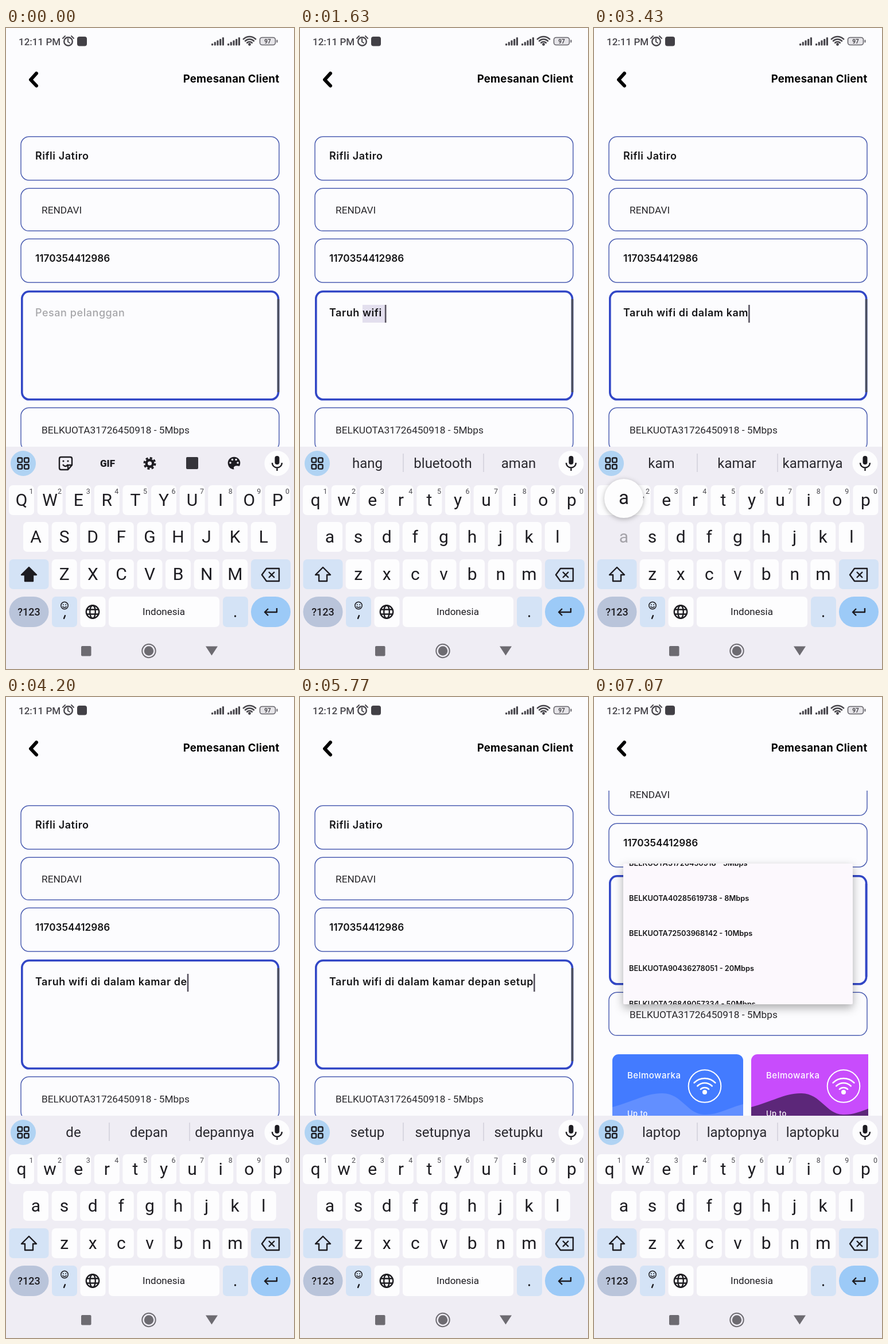
Animation, 502 px wide and 1116 px high, one loop 7.11 s. Source, as an HTML page:

```html
<!DOCTYPE html>
<html lang="id">
<head>
<meta charset="utf-8">
<title>Pemesanan</title>
<style>
html, body { margin: 0; width: 100%; height: 100%; overflow: hidden; background: #fcfcfe; }
#stage { display: block; width: 100%; height: 100%; }
text { font-family: Roboto, sans-serif; fill: #1d1c21; white-space: pre; }
.geo { font: 600 18px Inter, sans-serif; letter-spacing: .55px; fill: #151517; }
.title { font-size: 18.6px; font-weight: 700; letter-spacing: .25px; fill: #000; }
.num { font-size: 17.2px; letter-spacing: 0; }
.hint { font-weight: 500; fill: #a6a6a9; }
.pick { font-size: 17.3px; fill: #29282c; }
.item { font-size: 12.8px; letter-spacing: 0; }
.card { font-size: 15px; font-weight: 500; letter-spacing: .5px; fill: #fff; }
.small { font-size: 13px; }
.box { fill: none; stroke: #4d5fb2; stroke-width: 1.5; }
.focus { stroke: #3247c6; stroke-width: 3.6; }
.mid { text-anchor: middle; }
.key { font-size: 30px; }
.digit { font-size: 12.5px; fill: #4b4a50; }
.word { font-size: 24px; fill: #2a292f; }
.line { fill: none; stroke: #1d1c21; stroke-width: 2.4; stroke-linejoin: round; }
.round { stroke-linecap: round; }
.dark { fill: #1d1c21; }
.status { fill: #48464c; }
.statusline { stroke: #48464c; }
#pop { filter: drop-shadow(0 2px 4px rgba(0, 0, 0, .28)); }
#shade { filter: drop-shadow(0 6px 8px rgba(0, 0, 0, .32)); }
</style>
</head>
<body>
<svg id="stage" viewBox="0 0 502 1116" preserveAspectRatio="none"></svg>
<script>
const LOOP = 7110, SCROLL = 147, KEY_H = 52;

// word, time of its first letter, time per letter, time of the space after it
const WORDS = [
  ['Taruh', 240, 160, 1020],
  ['wifi', 1130, 130, 1560],
  ['di', 1860, 140, 2130],
  ['dalam', 2270, 130, 2920],
  ['kamar', 3080, 140, 3780],
  ['depan', 3980, 170, 5020],
  ['setup', 5160, 125, 5790],
  ['laptop', 5930, 120, 0]
];
const NEXT = {
  Taruh: ['di', 'dulu', 'uang'],
  wifi: ['hang', 'bluetooth', 'aman'],
  di: ['rumah', 'sini', 'mana'],
  dalam: ['rumah', 'hati', 'kamar'],
  kamar: ['mandi', 'tidur', 'depan'],
  depan: ['rumah', 'pintu', 'kamar'],
  setup: ['wifi', 'di', 'yang']
};
const SPECIAL = {
  Taru: ['Taru', 'Taruh', 'Taruna'],
  depan: ['depan', "depan'", 'depannya']
};
const PLANS = ['31726450918 - 5Mbps', '40285619738 - 8Mbps', '72503968142 - 10Mbps',
  '90436278051 - 20Mbps', '26849057334 - 50Mbps'].map(s => 'BELKUOTA' + s);

const typed = [];
for (const [word, start, step, space] of WORDS) {
  [...word].forEach((c, i) => typed.push({ c, t: start + i * step }));
  if (space) typed.push({ c: ' ', t: space });
}
const message = typed.map(e => e.c).join('');

const $ = id => document.getElementById(id);
const ease = x => 1 - Math.pow(1 - Math.min(1, Math.max(0, x)), 3);
const txt = (x, y, s, cls, id) => `<text x="${x}" y="${y}" class="${cls}"${id ? ` id="${id}"` : ''}>${s}</text>`;
const rect = (x, y, w, h, r, fill, extra = '') =>
  `<rect x="${x}" y="${y}" width="${w}" height="${h}" rx="${r}" fill="${fill}" ${extra}/>`;
const circle = (x, y, r, attrs) => `<circle cx="${x}" cy="${y}" r="${r}" ${attrs}/>`;
const path = (d, attrs = 'class="line"') => `<path d="${d}" ${attrs}/>`;
const field = (y, h) => rect(26, y, 450, h, 14, 'none', 'class="box"');

function wifi(x, y, radii, width, color) {
  const arcs = radii.map(r => {
    const k = r * .707;
    return `M${x - k} ${y - k}A${r} ${r} 0 0 1 ${x + k} ${y - k}`;
  }).join('');
  return path(arcs, `fill="none" stroke="${color}" stroke-width="${width}" stroke-linecap="round"`);
}

function statusBar() {
  let s = txt(22, 30, '12:11 PM', 'status', 'clock');
  s += circle(108.5, 23.5, 7.3, 'class="line statusline"') +
    path('M108 19v5l3 2M99 18l4-4M118 18l-4-4', 'class="line statusline round" style="stroke-width:2"') +
    rect(124, 15, 17, 16.5, 4, '#424046');
  for (const x of [358, 386])
    for (let i = 0; i < 5; i++) s += rect(x + i * 4.7, 27 - i * 2.7, 3.2, 3.5 + i * 2.7, 1, '#48464c');
  s += wifi(424.5, 30, [6, 10.5, 15], 2.7, '#48464c') + circle(424.5, 28.5, 2.4, 'class="status"');
  s += rect(442.5, 16.5, 27, 13, 4, '#e6e5e9', 'stroke="#65636a" stroke-width="1.6"') +
    rect(471.5, 20.5, 2, 5, 1, '#65636a') +
    txt(456, 26.8, '97', 'mid status', 'charge');
  return s;
}

function card(x, w, base, wave) {
  return `<svg x="${x}" y="769" width="${w}" height="150">` +
    rect(0, 0, 228, 150, 11, base) +
    path('M0 92C35 83 60 67 88 68C122 69 130 104 160 105C185 106 205 92 228 87V150H0Z', `fill="${wave}"`) +
    txt(26, 42, 'Belmowarka', 'geo card') + txt(26, 108, 'Up to', 'geo card small') +
    circle(161, 55.5, 28.3, 'fill="none" stroke="#fff" stroke-width="2"') +
    wifi(161, 68, [10, 18, 26], 2.6, '#fff') + circle(161, 66, 4, 'fill="#fff"') + '</svg>';
}

function form() {
  return '<svg x="0" y="163" width="502" height="566"><g id="page">' +
    field(189.3, 75.7) + txt(51, 229, 'Rifli Jatiro', 'geo') +
    field(279.3, 74) + txt(62, 323, 'RENDAVI', 'pick') +
    field(367.3, 75.7) + txt(51, 407, '1170354412986', 'geo num') +
    rect(27.8, 458.8, 446.8, 188, 12.5, 'none', 'class="box focus"') +
    path('M474.600 472V634', 'id="edge" stroke="#4b4f5e" stroke-width="3.6"') +
    rect(0, 482, 0, 31, 0, '#e3dfee', 'id="mark"') +
    txt(51, 502, 'Pesan pelanggan', 'geo hint', 'hint') +
    txt(51, 502, '', 'geo', 'row0') + txt(51, 528, '', 'geo', 'row1') +
    rect(0, 482, 2.6, 31, 0, '#57525f', 'id="caret"') +
    field(661.3, 75) + txt(62, 706, PLANS[0], 'pick') +
    card(32, 228, '#437bff', '#628fff') + card(274, 204, '#c84cfc', '#5c2779') +
    '</g></svg>';
}

function menu() {
  const items = PLANS.map((s, i) => txt(10, 45.5 + i * 61.3, s, 'geo item')).join('');
  return '<g id="menu">' + rect(51, 290, 400, 245, 2, '#fcf8fd', 'id="shade"') +
    `<svg id="list" x="51" y="290" width="400" height="245"><g id="items">${items}</g></svg></g>`;
}

const keys = {};
function letters() {
  let s = '';
  [['qwertyuiop', 5, 796], ['asdfghjkl', 30, 860], ['zxcvbnm', 79.7, 925]].forEach(([row, x0, y], r) => {
    [...row].forEach((c, i) => {
      const x = x0 + i * 49.6;
      keys[c] = { x: x + 22, y: y + 26, digit: r === 0 };
      s += rect(x, y, 44, KEY_H, 7, '#fdfdfe', `id="cap-${c}"`) + txt(x + 22, y + 36, c, 'mid key', 'key-' + c);
      if (r === 0) s += txt(x + 39, 810.5, (i + 1) % 10, 'mid digit');
    });
  });
  return s;
}

function tools() {
  const gear = circle(250.5, 758, 5.8, 'class="line" style="stroke-width:4.4"') +
    circle(250.5, 758, 9.4, 'class="line" style="stroke-width:3.2" stroke-dasharray="4 3.383"');
  const palette = circle(397.5, 757.5, 10.8, 'class="dark"') +
    [[391, 757], [394.5, 751.5], [401, 751.5], [404, 757]].map(p => circle(...p, 1.8, 'fill="#efedf4"')).join('') +
    path('M398 769c-3-5 0-8 10-6v6z', 'fill="#efedf4"');
  return '<g id="tools">' +
    path('M96 747h16q3 0 3 3v11l-7 8h-12q-3 0-3-3v-16q0-3 3-3zM108 768v-7h7M99 760q5 6 9 0') +
    circle(100, 754, 1.6, 'class="dark"') + circle(108, 754, 1.6, 'class="dark"') +
    txt(177, 763.5, 'GIF', 'mid', 'anim') + gear + rect(314, 747, 21, 21, 2, '#35343a') + palette + '</g>';
}

function keyboard() {
  const blue = '#d4e3f6';
  let s = rect(0, 729, 502, 387, 0, '#efedf4') + circle(30, 758, 22, 'fill="#b0d3f3"');
  for (const x of [20.5, 32]) for (const y of [748.5, 760]) s += rect(x, y, 7.6, 7.6, 1.8, 'none', 'class="line"');
  s += tools() + '<g id="words">' +
    path('M180 741V773M320 741V773', 'stroke="#cfcdd7" stroke-width="1.4"') +
    [117.5, 249, 381].map((x, i) => txt(x, 766, '', 'mid word', 'word' + i)).join('') + '</g>';
  s += circle(472.5, 758, 22, 'fill="#fdfdfe"') + rect(468.5, 745, 8, 15, 4, '#1d1c21') +
    path('M464 757a8.5 8.5 0 0 0 17 0M472.5 766v5');
  s += letters();
  s += rect(5.5, 925, 69, KEY_H, 7, blue) + rect(427, 925, 69, KEY_H, 7, blue) +
    path('M40 939l13 13h-6v11h-14v-11h-6z', 'class="line" id="shift"') +
    path('M446 952l8-11h22v22h-22zM458 947l10 10M468 947l-10 10');
  s += rect(5.5, 990, 69, 53, 26.5, '#b9c4da') + txt(40, 1022.5, '?123', 'mid', 'sym') +
    rect(80, 990, 44, 53, 7, blue) + circle(102, 1005.5, 6.2, 'class="line" style="stroke-width:1.5"') +
    path('M98.500 1007q3.500 4 7 0', 'class="line" style="stroke-width:1.4"') +
    circle(99.8, 1004, .9, 'class="dark"') + circle(104.2, 1004, .9, 'class="dark"') +
    path('M103 1023l-2 5', 'class="line round"');
  s += rect(129.5, 990, 44, 53, 7, '#fdfdfe') + circle(151, 1016.5, 11.2, 'class="line"') +
    '<ellipse cx="151" cy="1016.5" rx="4.800" ry="11.2" class="line"/>' + path('M141 1012.5h20M141 1020.5h20');
  s += rect(179, 990, 193, 53, 7, '#fdfdfe', 'id="space"') + txt(275, 1022, 'Indonesia', 'mid', 'lang') +
    rect(378, 990, 44, 53, 7, blue) + circle(399.5, 1024, 1.7, 'class="dark"') +
    rect(427, 990, 69, 53, 26.5, '#9ccaf7') + path('M472 1010v7h-21M457 1011l-6 6 6 6');
  s += rect(131, 1076, 17.5, 17.5, 2, '#6d6b71') + circle(249, 1084.5, 11.7, 'fill="none" stroke="#6d6b71" stroke-width="2"') +
    circle(249, 1084.5, 8.2, 'fill="#6d6b71"') + path('M348 1076.500h21l-10.500 16z', 'fill="#6d6b71"');
  return s;
}

function popup() {
  return '<g id="pop">' + circle(0, 0, 34, 'fill="#fdfdfe"') + txt(0, 10, '', 'mid', 'popkey') +
    '<g id="dots">' + [-5, 0, 5].map(x => circle(x, 24, 1.4, 'class="dark"')).join('') + '</g></g>';
}

$('stage').innerHTML = statusBar() +
  path('M53 79L43 90l10 10.500', 'fill="none" stroke="#000" stroke-width="6" stroke-linecap="round" stroke-linejoin="round"') +
  '<text x="476.5" y="94.5" text-anchor="end" class="geo title">Pemesanan Client</text>' +
  form() + menu() + keyboard() + popup();

for (const [id, font] of [['clock', '500 17px'], ['charge', '700 10px'], ['anim', '900 17px'],
  ['sym', '500 18px'], ['lang', '400 17px'], ['popkey', '400 33px']])
  $(id).style.font = font + ' Roboto, sans-serif';

const show = (id, on) => { $(id).style.display = on ? '' : 'none'; };
const set = (id, attrs) => { for (const k in attrs) $(id).setAttribute(k, attrs[k]); };

function suggest(text) {
  const parts = text.split(' '), last = parts[parts.length - 1];
  if (!last) return NEXT[parts[parts.length - 2]];
  const full = WORDS[parts.length - 1][0];
  return SPECIAL[last] || (last === full ? [last, last + 'nya', last + 'ku'] : [last, full, full + 'nya']);
}

function drawText(n) {
  const text = message.slice(0, n);
  const cut = n > 40 ? text.lastIndexOf(' ') + 1 : n;
  const row = cut < n ? 1 : 0;
  $('row0').textContent = text.slice(0, cut);
  $('row1').textContent = text.slice(cut);
  const x = 51 + (n ? $('row' + row).getComputedTextLength() : 0);
  set('caret', { x, y: 482 + row * 26 });
  if (n === 11) {
    const from = 51 + $('row0').getSubStringLength(0, 6);
    set('mark', { x: from, width: x - from });
  }
  show('hint', !n);
  show('tools', !n);
  show('words', n);
  if (n) suggest(text).forEach((w, i) => { $('word' + i).textContent = w; });
  for (const c in keys) $('key-' + c).textContent = n ? c : c.toUpperCase();
  $('shift').style.fill = n ? 'none' : '#1d1c21';
}

function drawPress(key, upper) {
  const k = keys[key];
  show('pop', k);
  if (!k) return;
  const x = Math.min(467, Math.max(35, k.x));
  set('pop', { transform: `translate(${x} ${k.y - 67})` });
  $('popkey').textContent = upper ? key.toUpperCase() : key;
  show('dots', k.digit);
}

let count = -1, held = null;
function hold(key) {
  if (key === held) return;
  for (const [c, down] of [[held, false], [key, true]]) {
    if (c === ' ') set('space', { fill: down ? '#dedde6' : '#fdfdfe' });
    else if (c) {
      show('cap-' + c, !down);
      $('key-' + c).style.opacity = down ? .35 : 1;
    }
  }
  held = key;
}

function render(t) {
  const n = typed.filter(e => e.t <= t).length;
  if (n !== count) drawText(count = n);

  const next = typed[n], lead = next ? next.t - t : Infinity;
  const key = lead <= 100 ? next.c.toLowerCase() : null;
  drawPress(key, !n);
  hold(lead > 40 ? key : null);

  show('caret', t > 90);
  show('mark', n === 11 && t < 1780);
  $('clock').textContent = t < 5500 ? '12:11 PM' : '12:12 PM';

  const scroll = SCROLL * ease((t - 6630) / 160);
  set('page', { transform: `translate(0 ${-163 - scroll})` });
  set('edge', { stroke: scroll ? '#3247c6' : '#4b4f5e' });

  const open = ease((t - 6800) / 110);
  show('menu', open > 0);
  set('shade', { height: 245 * open });
  set('list', { height: 245 * open });
  set('items', { transform: `translate(0 ${-42 * ease((t - 6920) / 150)})` });
}

const begin = performance.now();
function tick() {
  render((performance.now() - begin) % LOOP);
  requestAnimationFrame(tick);
}
tick();
</script>
</body>
</html>
```
